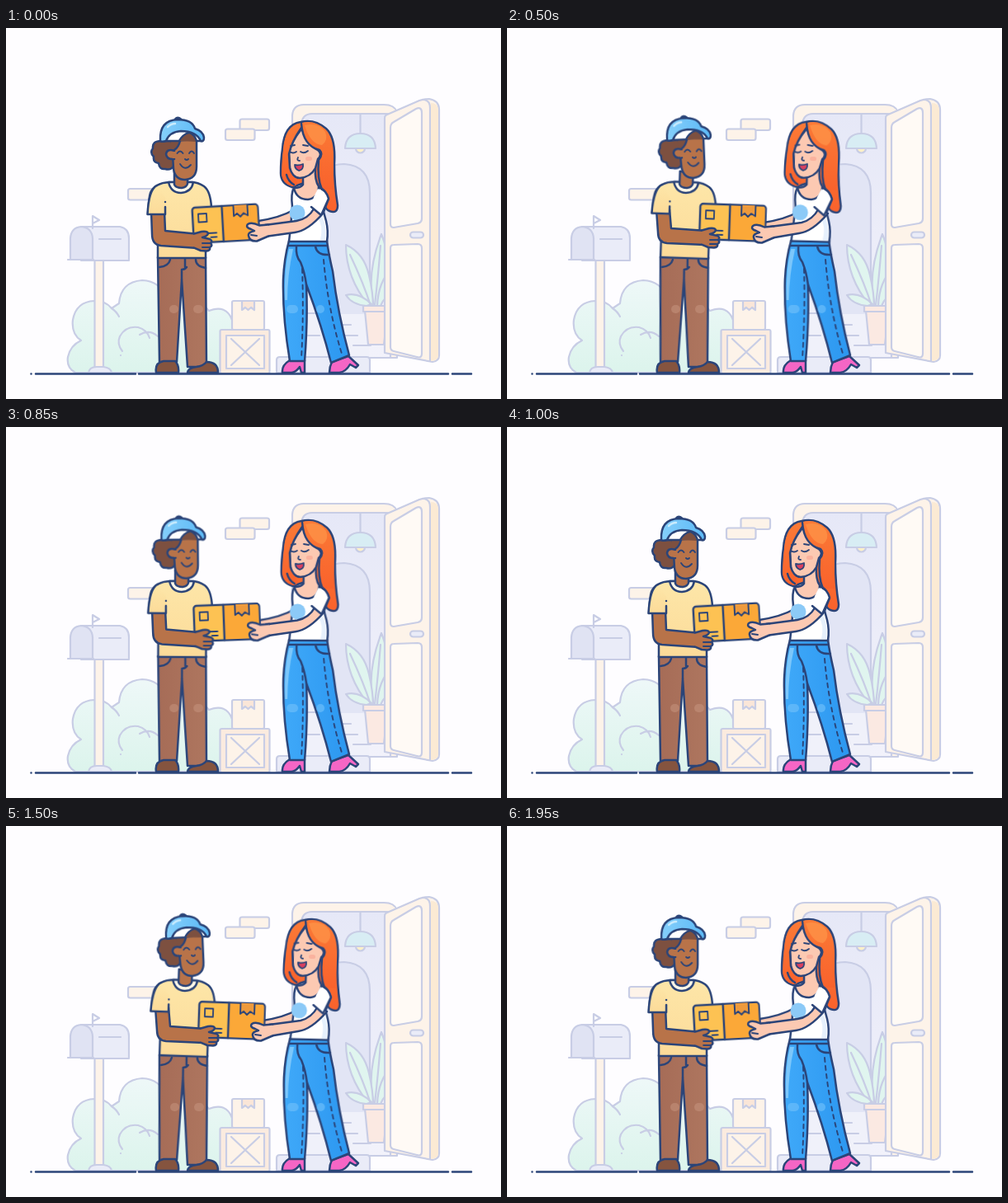
An HTML page for the animation above (2000 ms loop, 600 px wide and 450 px high).

```html
<!DOCTYPE html>
<html lang="en">
<head>
<meta charset="utf-8">
<title>Parcel handover</title>
<style>
html, body { margin: 0; width: 100%; height: 100%; overflow: hidden; background: #fefdff; }
svg { display: block; width: 600px; height: 450px; }
g { stroke-linecap: round; stroke-linejoin: round; }
.pale { stroke: #c8cde5; stroke-width: 2.2; fill: none; }
.ink { stroke: #2b4478; stroke-width: 2.5; fill: none; }
.flat { stroke: none; }

.cream { fill: #fdf3e9; }
.mint { fill: #e0f5ef; }
.lilac { fill: #eaecf8; }
.brown { fill: #b87349; }
.locks { fill: #7d5040; }
.skin { fill: #fcc9b2; }

/* every moving part swings between two poses */
.move { animation: .5s cubic-bezier(.37, 0, .63, 1) infinite alternate; }
.man-legs { animation-name: man-legs; transform-origin: 213px 410px; }
.man-torso { animation-name: man-torso; transform-origin: 213px 280px; }
.man-head { animation-name: man-head; transform-origin: 213px 135px; }
.man-arm { animation-name: man-arm; }
.man-hand { animation-name: man-hand; }
.parcel { animation-name: parcel; }
.her-legs { animation-name: her-legs; transform-origin: 366px 405px; }
.her-torso { animation-name: her-torso; transform-origin: 366px 262px; }
.her-arm { animation-name: her-arm; }
.her-hand { animation-name: her-hand; }

@keyframes man-legs { to { transform: skewX(-.83deg); } }
@keyframes man-torso { to { transform: translate(2px, 0) rotate(2deg); } }
@keyframes man-head { to { transform: translate(7px, -2px) rotate(-2.5deg); } }
@keyframes man-hand { to { transform: translate(8px, -4px); } }
@keyframes her-legs { to { transform: skewX(-.5deg); } }
@keyframes her-torso { to { transform: translate(1.4px, 0) rotate(1.5deg); } }
@keyframes her-hand { to { transform: translate(5px, 2px); } }
@keyframes parcel {
  from { transform: translate(225.5px, 218px) rotate(-3.2deg); }
  to { transform: translate(234.5px, 213px) rotate(2deg); }
}
@keyframes man-arm {
  from { d: path("M176 222L177 250Q177 263 188 264L232 267L234 250L193 246L192 222Z"); }
  to { d: path("M181 220L183 248Q183 260 194 261L240 263L242 246L199 243L197 220Z"); }
}
@keyframes her-arm {
  from { d: path("M374 218Q366 232 352 234L314 239L314 253L350 248Q366 246 385 224Z"); }
  to { d: path("M378 219Q370 233 357 236L319 241L319 255L354 249Q370 247 389 225Z"); }
}
</style>
</head>
<body>
<svg viewBox="0 0 600 450">
<defs>
  <linearGradient id="denim"><stop stop-color="#3fa9f9"/><stop offset="1" stop-color="#2c97f0"/></linearGradient>
  <linearGradient id="hair" x2="0" y2="1"><stop stop-color="#fb7a36"/><stop offset="1" stop-color="#f9622c"/></linearGradient>
  <linearGradient id="cap"><stop stop-color="#85cffb"/><stop offset="1" stop-color="#5cb9f6"/></linearGradient>
  <linearGradient id="cloth" x2="0" y2="1"><stop stop-color="#fde6a8"/><stop offset="1" stop-color="#fcdb99"/></linearGradient>
  <linearGradient id="trousers"><stop stop-color="#a66c57"/><stop offset="1" stop-color="#ae765f"/></linearGradient>
  <linearGradient id="bush" x2="0" y2="1"><stop stop-color="#eef8f8"/><stop offset="1" stop-color="#dcf4ec"/></linearGradient>
  <linearGradient id="hall" x2="0" y2="1"><stop stop-color="#e6e8f7"/><stop offset="1" stop-color="#f2f2fb"/></linearGradient>
</defs>

<!-- scenery -->
<g class="pale">
  <g class="cream">
    <rect x="283.500" y="110.500" width="35.500" height="13.500" rx="2.500"/>
    <rect x="266" y="122.500" width="35.500" height="13.500" rx="2.500"/>
    <rect x="148" y="195" width="40" height="13.500" rx="2.500"/>
  </g>

  <path fill="url(#bush)" d="M84 418Q73 412 75 399Q78 385 91 379Q79 371 81 354Q85 332 107 331Q121 331 128 340L137 334Q139 308 165 306Q188 307 193 328Q205 322 220 327Q236 330 246 343Q267 335 274 354Q277 372 268 384L274 418Z"/>
  <path d="M141 392Q134 383 138 374Q145 361 160 363Q171 366 174 376M162 372Q174 365 184 374M139 397V397.100M128 340Q134 344 137 350"/>

  <path class="cream" d="M107.500 282H118V413H107.500Z"/>
  <path class="lilac" d="M100 418Q101 411 110 411H118Q127 412 128 418Z"/>
  <path class="lilac" d="M91 241H138Q149 243 149 255V282H91Z"/>
  <path fill="#e0e3f3" d="M78 281V255Q79 242 91 241Q104 242 105 255V281Z"/>
  <path d="M75 281H106M113 256H139M105 243V228L113 233L105 237"/>

  <path class="cream" d="M347 412V106Q348 93 361 93H458Q471 93 474 102V400H347Z"/>
  <path fill="url(#hall)" d="M358 400V117Q359 104 371 104H466V400Z"/>
  <path fill="#e2e5f5" d="M376 400V195Q380 165 410 165Q441 167 441 200V360"/>
  <path class="flat" fill="#f0f1fa" d="M359 347H440V399H359Z"/>
  <path d="M359 346H378M366 373H380M392 347H404M399 360H418M409 373H426M421 385H442"/>
  <path d="M429.500 105V128"/>
  <circle cx="429.500" cy="146" r="5.500" fill="#fdf0c9"/>
  <path fill="#d8edf4" d="M411 146Q412 128 429.500 128Q447 128 448 146Z"/>

  <g class="mint">
    <path d="M446 338Q436 300 455 250Q466 276 459 306Q455 325 450 338Z"/>
    <path d="M440 337Q412 303 412 263Q434 273 440 300Q445 321 445 338Z"/>
    <path d="M437 337Q420 336 412 324Q428 320 443 335Z"/>
    <path d="M450 337Q451 308 468 291V322Q459 325 454 337Z"/>
    <path d="M417 275Q434 311 442 337M454 264Q451 302 447 336"/>
  </g>
  <path fill="#fbe9e2" d="M435 343H463L458 384H439Z"/>
  <path fill="#fbe9e2" d="M433 337H466V344H433Z"/>

  <path class="lilac" d="M328 418V403Q328 399 332 399H437Q441 399 441 403V418Z"/>

  <path class="cream" d="M459 109Q459 106 462 105L501 88Q506 86 513 86Q525 88 525 99V397Q525 404 517 405L459 394Z"/>
  <path d="M505 87Q514 87 514 97V404"/>
  <path class="flat" fill="#fbead4" d="M515 91Q524 91 524 100V397Q524 403 515 404Z"/>
  <path fill="#fffaf5" d="M466 121Q466 116 470 114L497 98Q504 95 504 103V231Q504 236 499 237L470 242Q466 242 466 238Z"/>
  <path fill="#fffaf5" d="M466 267Q466 263 470 263L499 262Q504 262 504 267V395Q504 401 498 399L470 392Q466 391 466 387Z"/>
  <rect class="lilac" x="490" y="247.500" width="16" height="7" rx="3.500"/>

  <rect class="cream" x="274" y="331" width="39" height="35" rx="2"/>
  <path fill="#fae6d8" d="M286 332V342L290 339L293.500 342L297 339L301 342V332"/>
  <rect fill="#fbebdf" x="259.500" y="366" width="60" height="53" rx="2"/>
  <rect class="cream" x="267" y="373" width="46" height="40"/>
  <path d="M273 377L307 409M307 377L273 409"/>
</g>

<!-- courier legs -->
<g class="ink">
  <g class="move man-legs">
    <path fill="url(#trousers)" d="M184 278H242L243 411H220L213 305L207 405H186Z"/>
    <path d="M213 305V293Q217 293 219 290M217 280V290M186 290Q197 289 199 281M242 291Q230 289 230 281"/>
    <g class="flat" fill="#c4917b" opacity=".6"><rect x="198" y="336" width="11" height="10" rx="5"/><rect x="227" y="336" width="12" height="10" rx="5"/></g>
  </g>
  <path fill="#85543f" d="M182 418Q180 406 191 404H205Q210 409 209 418Z"/>
  <path fill="#85543f" d="M220 418Q221 412 231 411Q239 410 243 405Q257 405 257 418Z"/>
</g>

<!-- courier body -->
<g class="ink">
  <g class="move man-torso">
    <path fill="url(#cloth)" d="M198 187Q180 188 175 200Q173 206 172 225H184V279H242V262L249 218Q248 198 240 192Q233 187 224 187Z"/>
    <path fill="#fff8e8" d="M197 187Q200 200 212 200Q225 199 227 187Z"/>
    <path class="brown" d="M204 174V190Q206 194 213 194Q219 193 220 189V176Z"/>
  </g>
  <g class="move man-head">
    <path class="locks" d="M188 137Q177 137 178 146Q174 151 179 156Q178 163 185 164Q186 172 193 171Q199 173 203 168L208 137Z"/>
    <path class="brown" d="M201 137L203 171Q205 184 217 184Q231 183 231 168V135Z"/>
    <path class="locks flat" d="M200 148V136H211Q210 146 204 148Z"/>
    <path d="M211 137Q209 145 204 148"/>
    <path class="brown" d="M204 149Q195 146 194 153Q195 160 204 159"/>
    <path class="brown flat" d="M202 150H207V158H202Z"/>
    <path d="M207.500 152Q211 147 214.500 152M222 152Q225 147 228 152M217 159Q219 161 221 159M211 165Q217 174 224 166" stroke-width="1.900"/>
    <path fill="#fff" d="M192 137Q196 124 212 123Q232 123 238 137H231Q228 128 222 127Q214 130 210 137Z"/>
    <path class="locks" d="M210 137Q214 129 222 127Q229 130 231 138" stroke-width="1.900"/>
    <path fill="url(#cap)" d="M187 136Q186 112 208 111Q226 111 229 122Q239 125 240 133Q240 138 236 137C232 128 224 125 212 125Q198 126 194 137Q187 139 187 136Z"/>
    <path d="M205 110.500Q208 107 212 110.500"/>
    <path d="M196 120Q200 116 205 116" stroke="#c9ebfd"/>
  </g>
</g>

<!-- recipient -->
<g class="ink">
  <path class="move her-hand skin" d="M348 221Q332 230 306 234V243L350 238Z"/>
  <path fill="#f566c5" d="M344 403H362V418H358L356 411Q351 418 346 418H335Q334 409 344 403Z"/>
  <path fill="#f566c5" d="M395 405L415 398L427 409L424 412L417 408Q412 417 404 418H392Q392 411 395 405Z"/>
  <g class="move her-legs">
    <path fill="url(#denim)" d="M343 258H389Q391 274 396 295Q402 345 416 397L394 406Q383 362 364 311Q366 355 362 404H344Q335 350 336 305Q337 280 343 258Z"/>
    <path class="flat" fill="#7cc7fb" d="M343 268H348Q341 300 341 330L338 330Q337 292 343 268Z"/>
    <path d="M342 264H389M352 265Q351 277 357 284Q362 296 364 311M375 265Q377 276 392 275"/>
    <path d="M359 292Q361 345 358 401M385 281Q390 340 407 395" stroke-dasharray="5 5" stroke-width="1.900"/>
    <g class="flat" fill="#6fc0fb" opacity=".65"><rect x="340" y="336" width="14" height="10" rx="5"/><rect x="376" y="336" width="10" height="10" rx="5"/></g>
  </g>
  <g class="move her-torso">
    <path fill="url(#hair)" d="M357 114Q337 117 335 147Q333 160 333 176Q333 189 347 193L370 185L384 200Q384 219 392 222Q402 226 402 215Q398 190 398 165Q400 133 388 122Q374 110 357 114Z"/>
    <path fill="#fff" d="M349 194Q345 201 347 216Q346 234 343 259H389Q391 246 388 234L385 223L391 207Q388 197 379 193Z"/>
    <path class="flat" fill="#e6f0fc" d="M381 227Q389 235 387 257H381Q385 240 378 231Z"/>
    <circle class="flat" cx="353" cy="224" r="9.500" fill="#8ccaf7"/>
    <path class="skin" d="M349 194Q352 208 366 208Q379 206 379 192Q374 185 375 169L360 179V190Q357 194 349 194Z"/>
    <path class="skin" d="M357 124Q345 139 343 152L344 170Q346 181 356 182Q369 181 375 170L378 159Q384 153 378 148Q366 143 361 124Z"/>
    <path class="flat" fill="url(#hair)" d="M357 116Q338 119 336 148L334 176Q335 189 347 192Q352 192 354 187Q344 180 343 153Q346 138 358 121Z"/>
    <path d="M358 121Q346 138 343 153L344 170Q347 180 354 182M340 178Q342 186 349 190"/>
    <path class="flat" fill="url(#hair)" d="M357 116Q372 110 387 123Q397 134 397 168V196H384Q378 186 379 160Q385 153 380 148Q363 143 358 121Z"/>
    <path d="M358 116Q360 143 380 148Q385 153 379 160Q377 183 383 196"/>
    <path class="flat" fill="#fd964a" d="M362 118Q379 114 387 126Q391 136 383 142Q369 141 362 118Z" opacity=".7"/>
    <g stroke-width="1.800">
      <path d="M344 150Q348 153 352 150M357 150Q361 153 366 149M345 143L350 142M360 142L366 143M354 157Q352 161 356 161"/>
      <path fill="#d9405f" d="M350 166Q355 167 360 165Q361 172 355 173Q350 171 350 166Z"/>
    </g>
    <rect class="flat" x="363" y="156" width="8" height="5" rx="2.500" fill="#f9a391" opacity=".6"/>
  </g>
</g>

<!-- parcel -->
<g class="ink">
  <g class="move parcel">
    <rect width="79.500" height="43" rx="3.500" fill="#fdc253"/>
    <path class="flat" fill="#fba838" d="M36 1H76Q78.500 1 78.500 4V39Q78.500 42 76 42H36Z"/>
    <path d="M36 0V43"/>
    <path fill="#ee9a3c" d="M50 0V13L54 10L58 14L62 10L67 13V0" stroke-width="1.900"/>
    <path d="M7 8H17V18H7ZM17 32H28M21 37H28" stroke-width="1.800"/>
  </g>
</g>

<!-- arms on top of the parcel -->
<g class="ink">
  <path class="move man-arm brown" d="M176 222L177 250Q177 263 188 264L232 267L234 250L193 246L192 222Z"/>
  <g class="move man-hand">
    <path class="brown" d="M228 249.500L237 247Q244 246 245 249Q245 252 238 254L247 256Q251 258 248 261Q251 264 247 266Q248 270 243 270.500L236 270L228 266.700"/>
    <path d="M238 261H247M238 266H246" stroke-width="1.900"/>
  </g>
  <g class="move man-torso">
    <path class="flat" fill="url(#cloth)" d="M182 191Q173 198 172 225H193V205Z"/>
    <path d="M183 191Q173 196 171.500 226H193V217M193 211V211.100"/>
  </g>

  <path class="move her-arm skin" d="M374 218Q366 232 352 234L314 239L314 253L350 248Q366 246 385 224Z"/>
  <g class="move her-hand">
    <path class="skin" d="M318 238.500L307 239.500Q298 235 293 238Q290 242 297 244L301 246Q293 248 294 252Q295 259 304 258.500L318 252.500"/>
    <path d="M297 251L304 252" stroke-width="1.900"/>
  </g>
  <g class="move her-torso">
    <path fill="#fff" class="flat" d="M378 195Q388 198 391 207L382 227L370 217L373 205Z"/>
    <path d="M380 193Q388 197 391 207L382 227L370 217"/>
  </g>
</g>

<!-- ground -->
<g class="ink">
  <path d="M30.500 419.500V419.600M36 419.500H157M161 419.500H536M541 419.500H564"/>
</g>
</svg>
</body>
</html>
```
